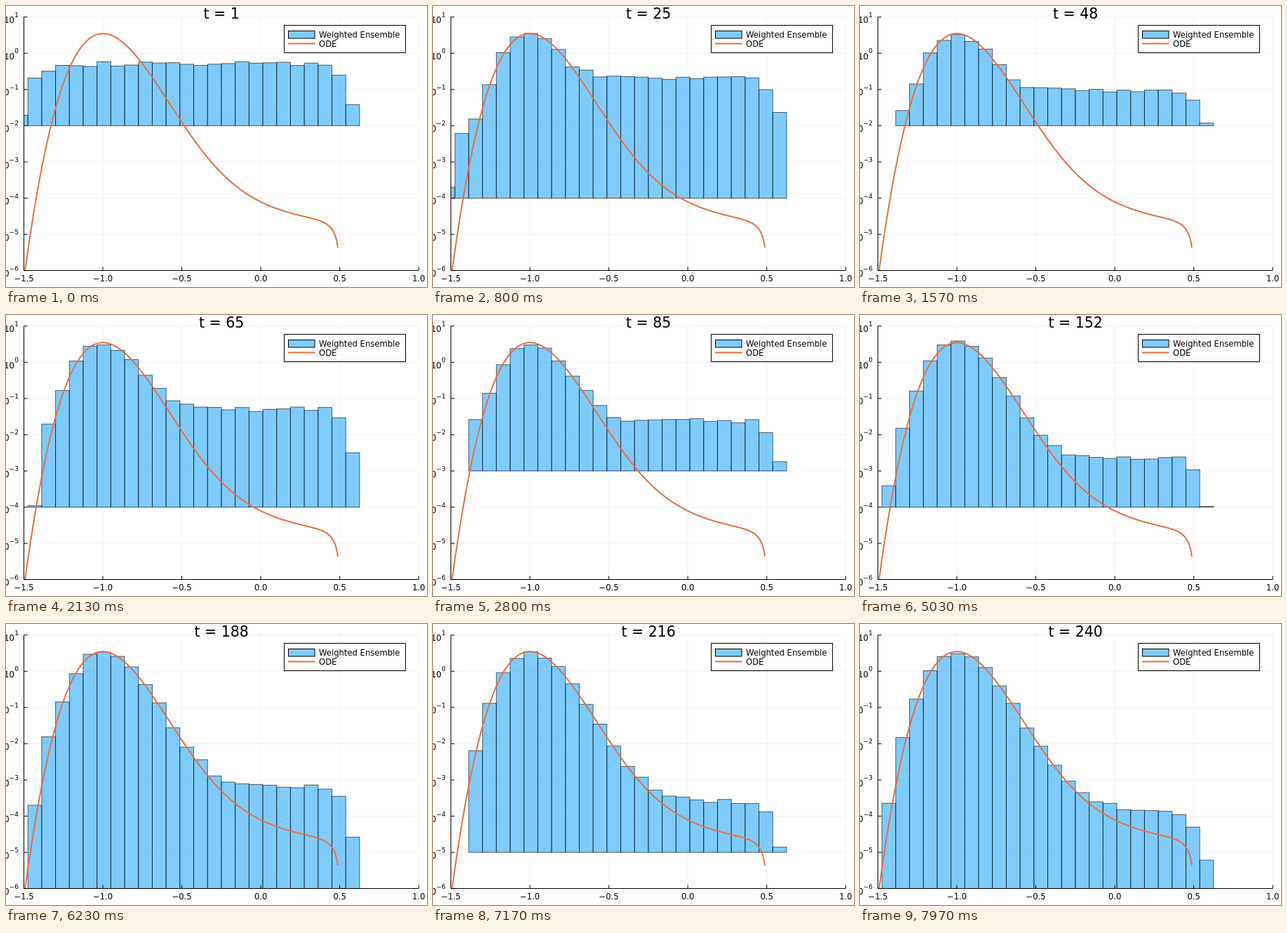
Write an HTML page that moves like this. It is 600 px wide and 400 px high and loops after 8 s.

```html
<!DOCTYPE html>
<html lang="en">
<head>
<meta charset="utf-8">
<style>
html, body { margin: 0; width: 100%; height: 100%; overflow: hidden; background: #fff; }
svg { display: block; width: 600px; height: 400px; }
text { font-family: "DejaVu Sans", sans-serif; font-size: 11.6px; fill: #000; }
.mid { text-anchor: middle; }
.end { text-anchor: end; }
.sup { font-size: 9px; }
.title { font-size: 20.5px; }
.grid { stroke: #000; stroke-opacity: .1; stroke-width: .5; }
.axis { stroke: #000; stroke-width: 1; fill: none; }
.bar { fill: #009afa; fill-opacity: .5; stroke: #000; stroke-opacity: .6; stroke-width: 1; }
.key { stroke-opacity: 1; }
.ode { fill: none; stroke: #e26f46; stroke-width: 2; stroke-linejoin: round; }
</style>
</head>
<body>
<svg viewBox="0 0 600 400">
  <clipPath id="area"><rect x="25.5" y="15.7" width="563" height="361"/></clipPath>
  <g id="grid"></g>
  <g clip-path="url(#area)">
    <g id="bars"></g>
    <path id="curve" class="ode"/>
  </g>
  <g id="axes"></g>
  <text id="title" class="mid title" x="307.2" y="18"></text>
  <rect x="396.5" y="27.5" width="173" height="39" fill="#fff" stroke="#000"/>
  <rect x="402.5" y="35.5" width="37.5" height="10.5" class="bar key"/>
  <path d="M402 53.6H440.5" class="ode"/>
  <text x="446" y="45.2">Weighted Ensemble</text>
  <text x="446" y="58">ODE</text>
</svg>
<script>
const LOOP = 8000, STEPS = 240, BARS = 26;
const LEFT = 25.5, RIGHT = 588.2, TOP = 15.7, BOTTOM = 376.5, DECADE = 51.56;
const BIN0 = -1.5622, BIN = .08751;
const WALL = .5, H = .002, STIFF = 10, PEAK = .543;

const $ = id => document.getElementById(id);
const X = x => LEFT + 225.08 * (x + 1.5);
const Y = log => 67.3 - DECADE * log;

function add(parent, tag, attrs, text) {
  const el = document.createElementNS("http://www.w3.org/2000/svg", tag);
  for (const k in attrs) el.setAttribute(k, attrs[k]);
  if (text) el.textContent = text;
  return parent.appendChild(el);
}
const signed = s => s.replace("-", "\u2212");

function buildAxes() {
  const grid = $("grid"), axes = $("axes");
  for (let v = -1.5; v <= 1; v += .5) {
    const x = X(v);
    add(grid, "path", { class: "grid", d: `M${x} ${TOP}V${BOTTOM}` });
    add(axes, "path", { class: "axis", d: `M${x} ${BOTTOM}v-5` });
    add(axes, "text", { class: "mid", x, y: 391.5 }, signed(v.toFixed(1)));
  }
  for (let p = -6; p <= 1; p++) {
    const y = Y(p);
    add(grid, "path", { class: "grid", d: `M${LEFT} ${y}H${RIGHT}` });
    add(axes, "path", { class: "axis", d: `M${LEFT} ${y}h5` });
    add(axes, "text", { class: "end", x: p < 0 ? 4.6 : 12, y: y + 8.6 }, "10");
    add(axes, "text", { class: "end sup", x: 18, y }, signed(String(p)));
  }
  add(axes, "path", { class: "axis", d: `M${LEFT} ${TOP}V${BOTTOM}H${RIGHT}` });
}

// Steady density of the double well (x^2-1)^2 with an absorbing wall
function solveSteady() {
  const well = x => STIFF * (x * x - 1) ** 2;
  const samples = [];
  let flux = 0;
  for (let x = WALL - H / 2; x > BIN0; x -= H) {
    if (x > -1) flux += Math.exp(well(x)) * H;
    samples.push({ x: x - H / 2, p: flux * Math.exp(-well(x - H / 2)) });
  }
  for (const s of samples) s.p *= 10 ** PEAK / flux;
  return samples;
}

const steady = solveSteady();
const binMeans = Array(BARS).fill(0);
for (const { x, p } of steady) binMeans[Math.floor((x - BIN0) / BIN)] += p * H / BIN;

function rand(step, i) {
  const s = Math.sin(step * 12.9898 + i * 78.233) * 43758.5453;
  return s - Math.floor(s);
}

// log10 height of one bin: a flat start drains into the steady density
function binLog(step, i) {
  const x = BIN0 + (i + .5) * BIN;
  const settle = Math.exp(-step / 5);
  const plateau = 10 ** (-.3 - .0155 * step);
  const edge = 10 ** (-.3 * Math.max(0, 2 - i, i - 22) ** 2);
  const rest = x < -.7 ? settle / 2 : plateau;
  const log = Math.log10(binMeans[i] * (1 - settle) + rest * edge);
  const outer = i < 3 || i > 23;
  // Bins by the left wall are often empty once they get thin
  if (i < 2 && rand(step, i + 40) < (-3 - log) / 3.5) return null;
  return log + (outer ? (rand(step, i) * 2 - .6) * .35 : (rand(step, i) * 2 - 1) * .07);
}

function heights(step) {
  const logs = Array.from({ length: BARS - 1 }, (_, i) => binLog(step, i));
  // Now and then one light walker strays into the last bin
  const stray = (step * .618034 + .43) % 1 / .12;
  logs.push(stray < 1 ? -6.2 + 1.4 * stray : null);
  return logs;
}

const rects = Array.from({ length: BARS }, (_, i) =>
  add($("bars"), "rect", { class: "bar", x: X(BIN0 + i * BIN), width: 225.08 * BIN }));

function draw(ms) {
  const step = Math.min(STEPS - 1, Math.floor((Math.floor(ms / 10) + .5) * .3));
  const logs = heights(step);
  // Bars stand on the power of ten below the smallest one
  const lowest = Math.min(...logs.filter(l => l !== null));
  const floor = Math.max(-6, Math.floor(lowest));
  rects.forEach((r, i) => {
    const shown = logs[i] !== null && logs[i] > floor;
    r.setAttribute("visibility", shown ? "visible" : "hidden");
    if (!shown) return;
    r.setAttribute("y", Y(logs[i]));
    r.setAttribute("height", (logs[i] - floor) * DECADE);
  });
  $("title").textContent = "t = " + (step + 1);
}

buildAxes();
$("curve").setAttribute("d", "M" + steady.filter(s => s.x < .489)
  .map(s => X(s.x).toFixed(2) + " " + Y(Math.log10(s.p)).toFixed(2)).join("L"));
draw(0);
let begin;
function tick(now) {
  begin ??= now;
  draw(Math.max(0, now - begin) % LOOP);
  requestAnimationFrame(tick);
}
requestAnimationFrame(tick);
</script>
</body>
</html>
```
